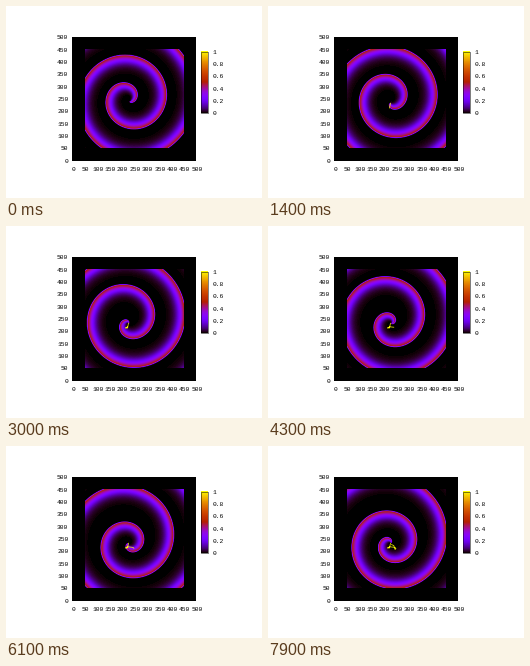
Write a matplotlib script that moves like this. It is 256 px wide and 192 px high and loops after 8 s.

```python
import numpy as np
import matplotlib.pyplot as plt
from matplotlib.animation import FuncAnimation
from matplotlib.colors import ListedColormap
from matplotlib.patches import Rectangle

W, H, DPI = 256, 192, 72
FRAMES, STEP = 80, 100
SPEED = 6.2                      # wave speed in px per second
LEFT, RIGHT, TOP, BOTTOM = 66.4, 190, 31, 154.5

# palette: red = sqrt(x), green = x^3, blue = sin(2 pi x)
ramp = np.linspace(0, 1, 256)
cmap = ListedColormap(np.column_stack(
    [np.sqrt(ramp), ramp**3, np.clip(np.sin(2 * np.pi * ramp), 0, 1)]))


def px(v):
    return LEFT + (RIGHT - LEFT) * v / 500


def py(v):
    return BOTTOM - (BOTTOM - TOP) * v / 500


def core(q):
    """Centre of the spiral while it emits quarter turn q."""
    s = np.tanh(q + 0.5)
    return 123 - 0.5 * s, 95.5 + 2 * s


def emitted(q):
    """Time at which quarter turn q leaves the core."""
    return (1.19 * q + 0.06 - 0.4 * np.exp(-((q + 2.6) / 0.9)**2)
            + 0.4 * np.exp(-((q - 0.8) / 2)**2))


def quarter(x, y, cx, cy):
    return (np.arctan2(y - cy, x - cx) / (np.pi / 2) - 1) % 4


def arrival(x, y, turn):
    """Arrival time of one turn of the spiral, and distance from its core."""
    q = quarter(x, y, 123, 95.5) + 4 * turn
    for _ in range(4):
        cx, cy = core(q)
        q = q + (quarter(x, y, cx, cy) - q + 2) % 4 - 2
    cx, cy = core(q)
    r = np.hypot(x - cx, y - cy)
    return emitted(q) + r / SPEED, r


N = 200
x0, x1, y0, y1 = px(50), px(450), py(450), py(50)
gx, gy = np.meshgrid(x0 + (x1 - x0) * (np.arange(N) + 0.5) / N,
                     y0 + (y1 - y0) * (np.arange(N) + 0.5) / N)
turns = [arrival(gx, gy, k) for k in range(-4, 2)]


def field(t):
    out = np.zeros((N, N))
    for when, r in turns:
        depth = SPEED * (t - when)
        back = np.maximum(depth, 0) * (1 + 3 / (r + 1))
        wave = 0.51 * np.exp(-(back / 7.2)**1.5) * np.clip(depth / 0.7 + 0.5, 0, 1)
        out = np.maximum(out, wave)
    return out


# path of the spiral tip: time, x, y
tip = np.array([(0.2, 122.4, 97.2), (1.4, 121.6, 102), (2.3, 119.4, 102),
                (3.0, 121.5, 100.8), (4.3, 125.8, 101.2), (5.3, 127.2, 101.6),
                (6.2, 128, 102.4), (6.9, 127, 103.5), (7.4, 125.8, 99.5),
                (7.9, 123.5, 98.6)])

fig = plt.figure(figsize=(W / DPI, H / DPI), dpi=DPI, facecolor="white")
ax = fig.add_axes([0, 0, 1, 1])
ax.axis("off")

ax.add_patch(Rectangle((LEFT, TOP), RIGHT - LEFT, BOTTOM - TOP, fc="black", ec="none"))
wave = ax.imshow(field(0), cmap=cmap, vmin=0, vmax=1, extent=(x0, x1, y1, y0),
                 interpolation="antialiased", zorder=2)
trace, = ax.plot([], [], color=cmap(1.0), lw=0.7, zorder=3)

BAR_X, BAR_W, BAR_TOP, BAR_BOTTOM = 195, 7, 45.5, 107
ax.imshow(ramp[::-1, None], cmap=cmap, vmin=0, vmax=1, aspect="auto",
          extent=(BAR_X, BAR_X + BAR_W, BAR_BOTTOM, BAR_TOP), zorder=2)
ax.add_patch(Rectangle((BAR_X, BAR_TOP), BAR_W, BAR_BOTTOM - BAR_TOP,
                       fc="none", ec="black", lw=0.5, zorder=3))


def label(x, y, text, ha):
    ax.text(x, y, text, ha=ha, va="center_baseline", fontsize=6.2,
            family="Liberation Mono", color="black")


for v in range(0, 501, 50):
    label(px(v) + 0.8, 162.7, str(v), "center")
    label(62.3, py(v) + 0.3, str(v), "right")
for v in (0, 0.2, 0.4, 0.6, 0.8, 1):
    label(206.8, BAR_BOTTOM + (BAR_TOP - BAR_BOTTOM) * v + 0.3, f"{v:g}", "left")

ax.set_xlim(0, W)
ax.set_ylim(H, 0)
ax.set_aspect("auto")


def draw(i):
    t = i * STEP / 1000
    wave.set_data(field(t))
    s = np.linspace(tip[0, 0], max(t, tip[0, 0]), 60)
    trace.set_data(np.interp(s, tip[:, 0], tip[:, 1]),
                   np.interp(s, tip[:, 0], tip[:, 2]))
    return wave, trace


anim = FuncAnimation(fig, draw, frames=FRAMES, interval=STEP, repeat=True,
                     repeat_delay=0, blit=False)
plt.show()
```
